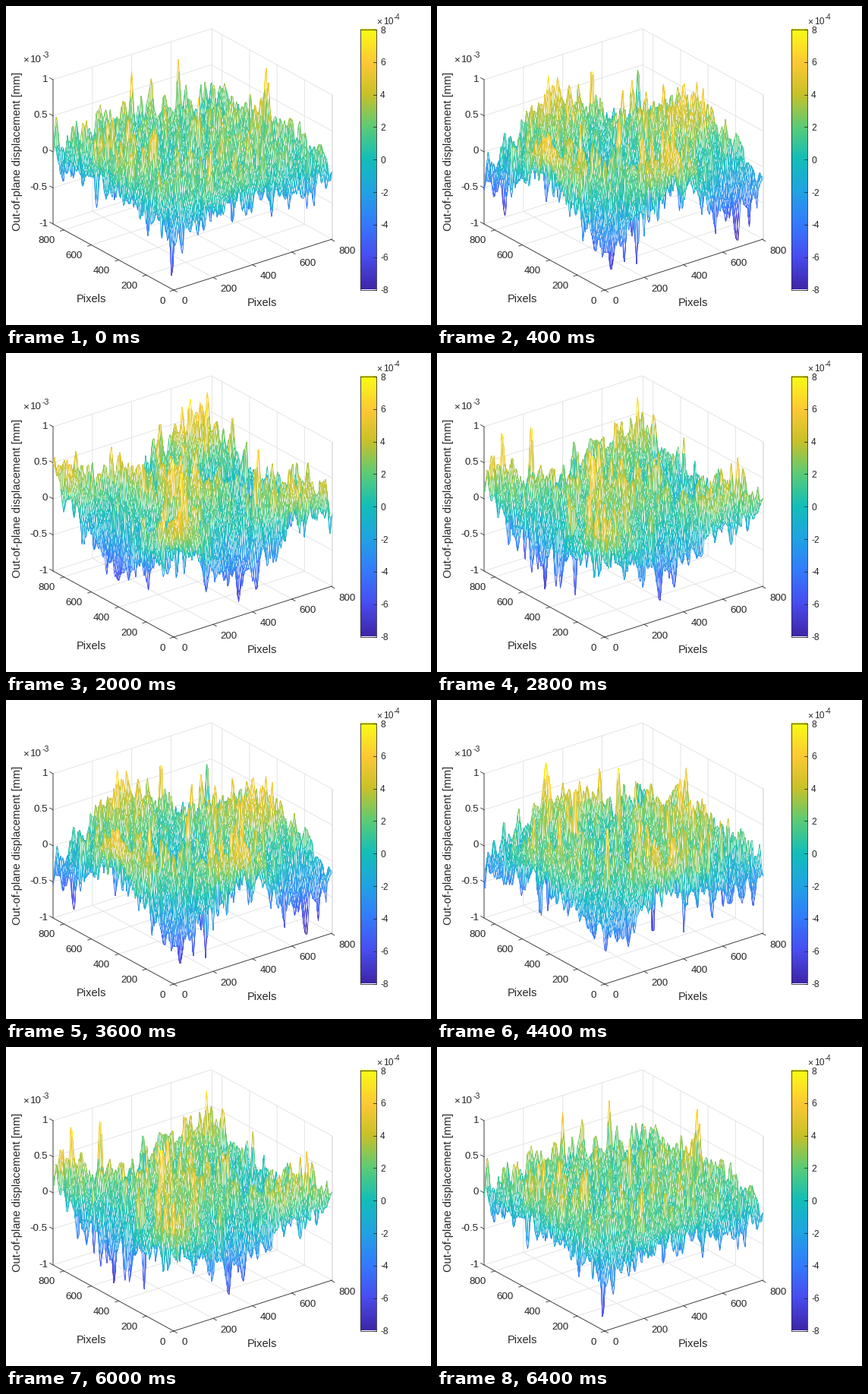
A matplotlib script that plays this animation: 560x420 px, repeating every 6800 ms.

```python
import numpy as np
import matplotlib.pyplot as plt
from matplotlib.animation import FuncAnimation
from matplotlib.collections import PolyCollection
from matplotlib.colors import LinearSegmentedColormap, Normalize

W, H, DPI = 560, 420, 100
PX = 72 / DPI
STATES, FRAMES, STEP = 8, 17, 400
INK, GRID = "#262626", "#dedede"
X_MAX, Y_MAX = 804, 879
NX, NY = 135, 145

plt.rcParams["font.family"] = "Liberation Sans"
plt.rcParams["axes.unicode_minus"] = False

parula = LinearSegmentedColormap.from_list("parula", [
    "#3e26a8", "#484df0", "#347afd", "#21a3e3", "#12beb9",
    "#5ccc76", "#c8c129", "#fec934", "#f9fb15"])
norm = Normalize(-0.8, 0.8)


def project(u, v, z):
    """Unit floor position and height in 1e-3 mm to stage pixels."""
    return 221 + 208.5 * u - 159 * v, 279 - 67 * u - 87 * v - 95 * z


# Far corner first, so that nearer cells cover farther ones
U, V = np.meshgrid(np.linspace(1, 0, NX), np.linspace(1, 0, NY))
EDGE = np.maximum(abs(2 * U - 1), abs(2 * V - 1)) ** 4
MODE = (0.28 + 0.16 * EDGE) * np.cos(2.4 * np.pi * U) * np.cos(2 * np.pi * V)


def blur(a):
    a = a[:-2] / 4 + a[1:-1] / 2 + a[2:] / 4
    return a[:, :-2] / 4 + a[:, 1:-1] / 2 + a[:, 2:] / 4


def speckle(seed):
    n = np.random.default_rng(seed).normal(size=(NY + 4, NX + 4))
    n = blur(blur(n))
    n /= n.std()
    return 0.13 * n + 0.008 * n ** 3


def corners(a):
    return np.stack([a[:-1, :-1], a[:-1, 1:], a[1:, 1:], a[1:, :-1]], axis=2)


def surface(k):
    swing = np.sin(2 * np.pi * (k + 0.3) / STATES)
    z = 0.04 - 0.06 * EDGE - swing * MODE + speckle(40 + k)
    z = np.clip(z, -0.95, 0.9)
    verts = corners(np.stack(project(U, V, z), axis=-1)).reshape(-1, 4, 2)
    return verts, parula(norm(corners(z).mean(axis=2).ravel()))


fig = plt.figure(figsize=(W / DPI, H / DPI), dpi=DPI, facecolor="white")
ax = fig.add_axes([0, 0, 1, 1])
ax.axis("off")


def line(pts, color=INK, z=1):
    x, y = zip(*pts)
    ax.plot(x, y, color=color, lw=0.8 * PX, zorder=z)


def tick(p, d):
    line([p, (p[0] + d[0], p[1] + d[1])], INK, 2)


def text(x, y, s, size=13.33, ha="center", va="center_baseline", **kw):
    ax.text(x, y, s, fontsize=size * PX, color=INK, ha=ha, va=va, **kw)


def exponent(x, y, s, size):
    text(x, y, "×", size, "left", "baseline")
    text(x + 0.75 * size, y, "10", size, "left", "baseline")
    text(x + 1.92 * size, y - 0.5 * size, s, 0.8 * size, "left", "baseline")


# Axes box, grid, ticks
for t in range(0, 801, 200):
    u, v = t / X_MAX, t / Y_MAX
    if t < 800:
        line([project(u, 0, -1), project(u, 1, -1), project(u, 1, 1)], GRID)
    line([project(0, v, -1), project(1, v, -1), project(1, v, 1)], GRID)
    px, py = project(u, 0, -1)
    tick((px, py), (4.4, 2.4))
    text(px + 10, py + 14, str(t), ha="left")
    px, py = project(0, v, -1)
    tick((px, py), (-4.8, 1.5))
    text(px - 11.5, py + 13, str(t), ha="right")
for z in (-1, -0.5, 0, 0.5, 1):
    line([project(0, 1, z), project(1, 1, z), project(1, 0, z)], GRID)
    px, py = project(0, 1, z)
    tick((px, py), (-4.4, -2.4))
    text(55, py - 2, f"{z:g}", ha="right")
line([project(1, 1, -1), project(1, 1, 1)], GRID)
line([project(1, 0, -1), project(1, 0, 1)], GRID)
line([project(0, 1, 1), project(0, 1, -1), project(0, 0, -1),
      project(1, 0, -1)], INK, 2)

exponent(22, 74.5, "-3", 13.33)
text(337.5, 389.5, "Pixels", 14.67)
text(112.5, 385, "Pixels", 14.67)
text(15, 191, "Out-of-plane displacement [mm]", 14.67, va="center", rotation=90)

# Colour bar
L, R, T, B = 467, 487.5, 31, 373.5
ax.imshow(np.linspace(1, 0, 256)[:, None], cmap=parula, extent=(L, R, B, T),
          aspect="auto", zorder=2)
ax.set_xlim(0, W)
ax.set_ylim(H, 0)
line([(L, T), (R, T), (R, B), (L, B), (L, T)], INK, 4)
for n in range(-8, 9, 2):
    y = B - (n + 8) / 16 * (B - T)
    line([(R - 4, y), (R, y)], INK, 4)
    text(493, y, str(n), 12, "left")
exponent(488, 24, "-4", 12)

shapes = [surface(k) for k in range(STATES)]
mesh = PolyCollection(shapes[0][0], facecolors="white",
                      edgecolors=shapes[0][1], linewidths=0.8 * PX, zorder=3)
mesh.set_joinstyle("bevel")
ax.add_collection(mesh, autolim=False)


def update(i):
    verts, colors = shapes[i % STATES]
    mesh.set_verts(verts)
    mesh.set_edgecolor(colors)
    return [mesh]


anim = FuncAnimation(fig, update, frames=FRAMES, interval=STEP, repeat=True,
                     repeat_delay=0, blit=False)
plt.show()
```
